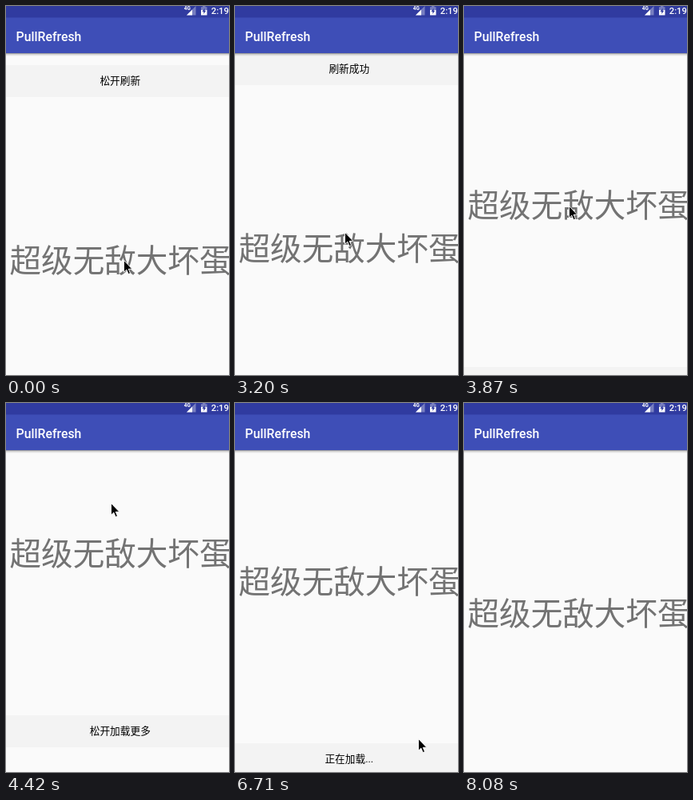
These frames come from a looping animation (279 by 462 pixels, 8690 ms). An HTML page:

```html
<!DOCTYPE html>
<html lang="zh-CN">
<head>
<meta charset="utf-8">
<title>PullRefresh</title>
<style>
  html, body { margin: 0; width: 100%; height: 100%; overflow: hidden; background: #fafafa; }
  svg { display: block; width: 100%; height: 100%; }
  text { font-family: Roboto, "Noto Sans CJK SC", "Noto Sans CJK", sans-serif; }
  .bar text { fill: #fff; font-weight: 500; }
  .strip rect { fill: #f3f3f3; }
  .strip text { font-size: 12.7px; fill: #000; text-anchor: middle; }
  .headline { font-size: 39.6px; fill: #737373; text-anchor: middle; }
</style>
</head>
<body>
<svg viewBox="0 0 279 462">
  <defs>
    <linearGradient id="shade" x2="0" y2="1">
      <stop offset="0" stop-color="#000" stop-opacity=".45"/>
      <stop offset=".4" stop-color="#000" stop-opacity=".15"/>
      <stop offset="1" stop-color="#000" stop-opacity="0"/>
    </linearGradient>
  </defs>
  <rect width="279" height="462" fill="#fafafa"/>

  <g id="content">
    <g class="strip" transform="translate(0 19)">
      <rect width="279" height="40"/>
      <text id="header" x="142.8" y="24"></text>
    </g>
    <text class="headline" x="143" y="278">超级无敌大坏蛋</text>
    <g class="strip" transform="translate(0 466)">
      <rect width="279" height="40"/>
      <text id="footer" x="142.8" y="24"></text>
    </g>
  </g>

  <g class="bar">
    <rect y="59" width="279" height="4" fill="url(#shade)"/>
    <rect width="279" height="59" fill="#3e4eb7"/>
    <rect width="279" height="14.5" fill="#303ba0"/>
    <text x="12.6" y="43.6" font-size="15.8">PullRefresh</text>
    <text x="256.8" y="10.2" font-size="11.2">2:19</text>
    <text x="222.8" y="5.4" font-size="6.4" style="font-weight:700">4G</text>
    <path d="M226 11.5L237.5 0V11.5Z" fill="#fff" opacity=".35"/>
    <path d="M226 11.5L233 4.5V11.5Z" fill="#fff"/>
    <path d="M246 0H249.5V1.2H251.5V5H244V1.2H246Z" fill="#fff" opacity=".35"/>
    <path d="M244 5H251.5V11.5H244Z" fill="#fff"/>
    <path d="M248.6 2.8L245.4 7H247.3V10L250.2 5.8H248.6Z" fill="#303ba0"/>
  </g>

  <path id="pointer" d="M.5 .5V15.2L3.8 12.1L6.1 17.6L8.5 16.6L6.2 11.3H10.8Z"
        fill="#000" stroke="#fff" stroke-width=".9"/>
</svg>
<script>
const LOOP = 8690;
const STRIP = 40;
const [content, header, footer, pointer] =
  ['content', 'header', 'footer', 'pointer'].map(id => document.getElementById(id));

const progress = (t, from, to) => Math.min(1, Math.max(0, (t - from) / (to - from)));
const mix = (a, b, p) => a + (b - a) * p;
const smooth = p => (1 - Math.cos(Math.PI * p)) / 2;
const settle = (t, from, to, a, b) => mix(a, b, smooth(progress(t, from, to)));

// Pointer moves outside the upward drag: start, end, from, to
const moves = [
  [10, 170, [147, 318], [138, 287]],
  [540, 620, [138, 287], [137, 285]],
  [1519, 1520, [137, 285], [137, 283]],
  [6205, 6420, [131, 124], [222, 408]],
  [6680, 6710, [222, 408], [229, 420]],
  [7860, 8070, [229, 420], [254, 468]]
];

// The drag speeds up until 4060 ms, then slows to its highest point
function dragPoint(t) {
  const x = mix(137, 131, progress(t, 3450, 3870));
  const y = t < 4060
    ? 283 - 33 * (Math.max(0, t - 3450) / 420) ** 2.5
    : mix(199, 124.5, 1 - (1 - progress(t, 4060, 4400)) ** 2);
  return [x, y];
}

function pointerAt(t) {
  if (t >= 3450 && t < 6205) return dragPoint(t);
  const [start, end, from, to] = moves.filter(([begin]) => begin <= t).pop() || moves[0];
  const p = progress(t, start, end);
  return [mix(from[0], to[0], p), mix(from[1], to[1], p)];
}

function offsetAt(t) {
  if (t < 3200) return settle(t, 10, 170, 55, STRIP);
  if (t < 3450) return settle(t, 3200, 3440, STRIP, 0);
  if (t < 4450) return Math.min(0, -14 - (250 - dragPoint(t)[1]) * 0.488);
  if (t < 7670) return settle(t, 4450, 4700, -75, -STRIP);
  return settle(t, 7670, 7910, -STRIP, 0);
}

function headerLabel(t) {
  return t < 30 ? '松开刷新' : t < 3200 ? '正在刷新...' : '刷新成功';
}

function footerLabel(t, offset) {
  if (t < 4450) return offset > -STRIP ? '上拉加载更多' : '松开加载更多';
  return t < 7670 ? '正在加载...' : '加载成功';
}

function place(node, x, y) {
  node.setAttribute('transform', `translate(${Math.round(x)} ${Math.round(y)})`);
}

function draw() {
  const t = performance.now() % LOOP;
  const offset = Math.round(offsetAt(t));
  place(content, 0, offset);
  place(pointer, ...pointerAt(t));
  header.textContent = headerLabel(t);
  footer.textContent = footerLabel(t, offset);
  requestAnimationFrame(draw);
}
draw();
</script>
</body>
</html>
```
